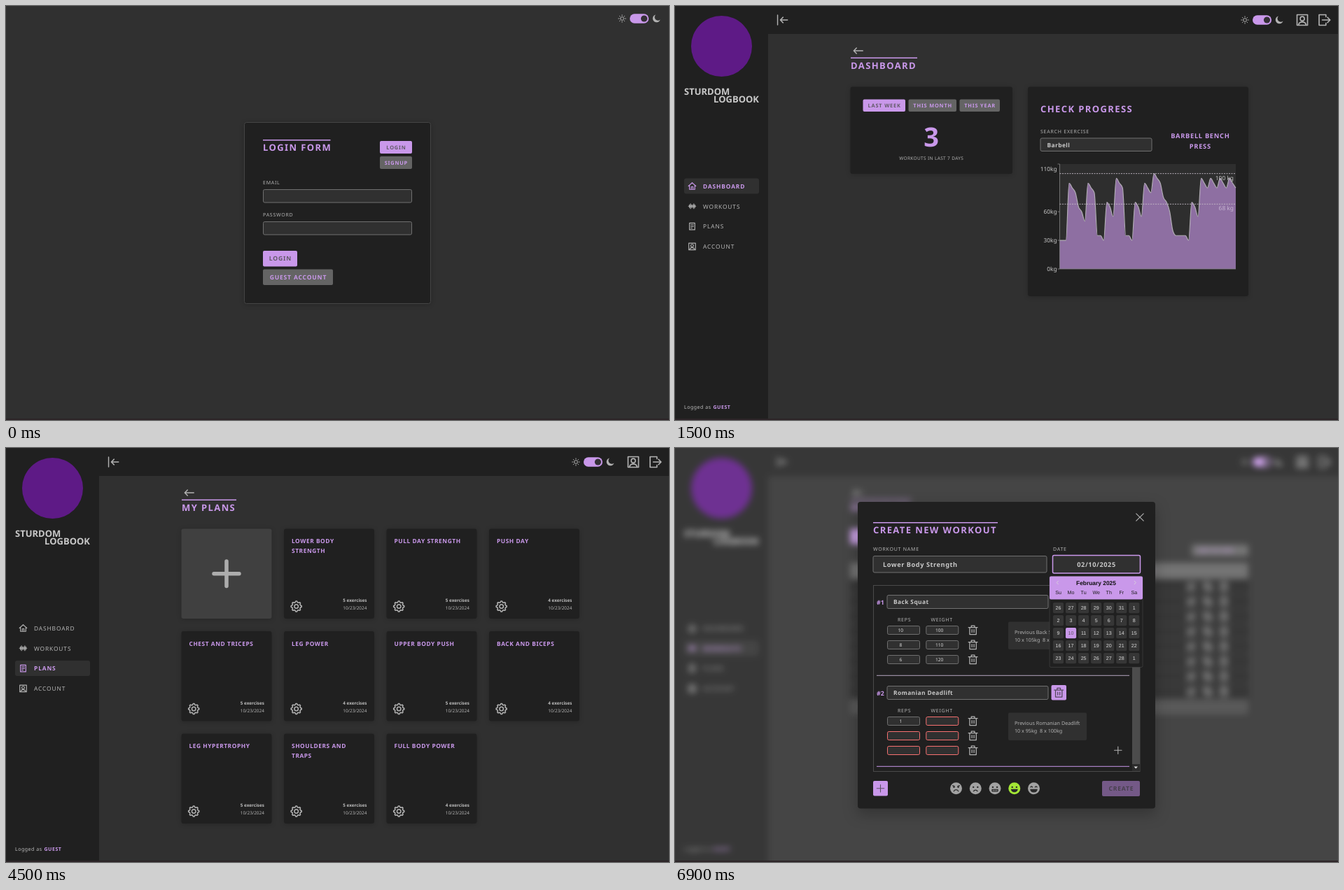
Animation, 947 px wide and 592 px high, one loop 7.5 s. Source, as an HTML page:

```html
<!DOCTYPE html>
<html lang="en">
<head>
<meta charset="utf-8">
<title>Training app tour</title>
<style>
html, body { margin: 0; width: 100%; height: 100%; overflow: hidden; background: #303030; }
svg { display: block; width: 947px; height: 592px; font-family: "Noto Sans", "Open Sans", sans-serif; text-rendering: geometricPrecision; }
text { white-space: pre; }
.scene { visibility: hidden; animation: show 7.5s step-end infinite; }
@keyframes show { 0% { visibility: visible } 20%, 100% { visibility: hidden } }
.card { filter: drop-shadow(0 1.5px 3px rgba(0, 0, 0, .2)); }
.modal { filter: drop-shadow(0 8px 10px rgba(0, 0, 0, .25)); }
.blur { filter: blur(5px); }
.picker { font-family: "Liberation Sans", Arial, sans-serif; }
</style>
</head>
<body>
<svg id="stage" viewBox="0 0 947 592"></svg>
<script>
const ACC = '#c998ea', DARK = '#202020', BG = '#303030', MID = '#646464',
      TXT = '#b2b2b2', LIGHT = '#dcdcdc', RED = '#f87171', LIME = '#a3e635';

const range = n => [...Array(n).keys()];
const each = (list, fn) => list.map(fn).join('');

// Basic shapes
const rect = (x, y, w, h, fill, r = 0, more = '') =>
  `<rect x="${x}" y="${y}" width="${w}" height="${h}" rx="${r}" fill="${fill}" ${more}/>`;
const circle = (x, y, r, fill, more = '') =>
  `<circle cx="${x}" cy="${y}" r="${r}" fill="${fill}" ${more}/>`;
const path = (d, color, sw = 1, more = '') =>
  `<path d="${d}" fill="none" stroke="${color}" stroke-width="${sw}" ${more}/>`;
const text = (x, y, s, size, { w = 400, c = TXT, ls = 0, a = 'start' } = {}) =>
  `<text x="${x}" y="${y}" font-size="${size}" font-weight="${w}" fill="${c}" letter-spacing="${ls}" text-anchor="${a}">${s}</text>`;

// Line icons on a 24 unit grid
const gear = range(32).map(i => {
  const r = i % 4 < 2 ? 11 : 8.7, t = (i - .5) * Math.PI / 16;
  return `${i ? 'L' : 'M'}${(12 + r * Math.cos(t)).toFixed(2)} ${(12 + r * Math.sin(t)).toFixed(2)}`;
}).join('') + 'zM8 12a4 4 0 1 0 8 0a4 4 0 1 0-8 0';
const rays = each(range(8), i => {
  const c = Math.cos(i * Math.PI / 4), s = Math.sin(i * Math.PI / 4);
  return `M${12 + 8.5 * c} ${12 + 8.5 * s}L${12 + 11 * c} ${12 + 11 * s}`;
});
const ICONS = {
  edit: 'M11 4H5a3 3 0 0 0-3 3v12a3 3 0 0 0 3 3h12a3 3 0 0 0 3-3v-6M8 16l1-4.5L18.5 2l3.500 3.500L12.500 15z',
  copy: 'M7 7h15v15H7zM2 17V2h15M14.500 10.500v8M10.500 14.500h8',
  trash: 'M1 6h22M4 6v17h16V6M8 6V1.500h8V6M9.500 11v7M14.500 11v7',
  down: 'M5 8.500l7 7 7-7',
  up: 'M5 15.500l7-7 7 7',
  left: 'M15 5l-7 7 7 7',
  right: 'M9 5l7 7-7 7',
  plus: 'M12 1v22M1 12h22',
  close: 'M2 2l20 20M22 2L2 22',
  back: 'M24 12H1M8 5l-7 7 7 7',
  collapse: 'M2 1v22M24 12H8M14 6l-6 6 6 6',
  home: 'M1 12L12 2l11 10M4 10v12h16V10M9.500 22v-8h5v8',
  plans: 'M4 2h16v20H4zM8 7h8M8 12h8M8 17h4',
  account: 'M2 2h20v20H2zM8 9.500a4 4 0 1 0 8 0a4 4 0 1 0-8 0M5 21c1-7 13-7 14 0',
  workouts: 'M4 8v8M7 5v14M10 8v8M14 8v8M17 5v14M20 8v8M1 12h22',
  logout: 'M15 6V2H2v20h13v-4M8 12h15M18 7l5 5-5 5',
  sort: 'M1 4h14M1 10h11M1 16h8M1 22h6M19 3v18M14.500 17l4.500 4.500 4.500-4.500',
  sun: 'M7 12a5 5 0 1 0 10 0a5 5 0 1 0-10 0' + rays,
  gear
};
const icon = (name, x, y, size, color = TXT, sw = 2.2) =>
  `<g transform="translate(${x - size / 2} ${y - size / 2}) scale(${size / 24})">` +
  path(ICONS[name], color, sw, 'stroke-linejoin="round" stroke-linecap="round"') + '</g>';

// Rating faces on a unit circle
const INK = '#2a2a2a';
const eyes = circle(-.36, -.22, .14, INK) + circle(.36, -.22, .14, INK);
const FACES = {
  awful: eyes + path('M-.62-.5l.4.16M.62-.5l-.4.16M-.42.52c.2-.4.64-.4.84 0', INK, .15),
  bad: eyes + path('M-.36.5c.2-.3.52-.3.72 0', INK, .16),
  fair: eyes + rect(-.55, .12, 1.1, .42, INK, .12) + path('M-.45.33h.9M-.2.18v.3M.2.18v.3', '#aaa', .06),
  good: eyes + `<path d="M-.58.1h1.16a.58.54 0 0 1-1.16 0z" fill="${INK}"/>`,
  great: path('M-.58-.16q.2-.34.4 0M.18-.16q.2-.34.4 0', INK, .15) +
    `<path d="M-.62.1h1.24a.62.58 0 0 1-1.24 0z" fill="${INK}"/>`
};
const FACE_COLORS = { awful: RED, fair: '#facc15', good: LIME, great: '#4ade80' };
const face = (type, x, y, r, color = FACE_COLORS[type]) =>
  `<g transform="translate(${x} ${y}) scale(${r})">${circle(0, 0, 1, color)}${FACES[type]}</g>`;

// Interface parts
const card = (x, y, w, h, fill = DARK) => rect(x, y, w, h, fill, 3, 'class="card"');
const title = (x, y, s, w) =>
  rect(x, y - 16, w, 1.5, ACC) + text(x, y, s, 13, { w: 700, c: ACC, ls: 1.4 });
const label = (x, y, s) => text(x, y, s, 7, { w: 500, ls: .75 });
const field = (x, y, w, h, border = '#707070', sw = 1) =>
  rect(x + .5, y + .5, w - 1, h - 1, BG, 2, `stroke="${border}" stroke-width="${sw}"`);
const button = (x, y, w, h, s, on = true, size = 8.6, fill = on ? ACC : MID, c = on ? '#625a68' : ACC) =>
  rect(x, y, w, h, fill, 2) +
  text(x + w / 2 + .4, y + h / 2 + size * .36, s, size, { w: 600, c, ls: .8, a: 'middle' });

const themeSwitch = (x, y) =>
  icon('sun', x, y, 11.500, TXT, 2) + rect(x + 11, y - 6.7, 27, 13.4, ACC, 6.7) +
  circle(x + 31.5, y, 4.6, '#343036') +
  `<path transform="translate(${x + 43} ${y - 6}) scale(.5)" d="M23 15A11 11 0 1 1 10 1a9 9 0 0 0 13 14z" fill="${TXT}"/>`;

const NAV = ['home', 'workouts', 'plans', 'account'];
function shell(active) {
  const nav = each(NAV, (name, i) => {
    const y = 257.5 + i * 28.8, on = i === active;
    return (on ? rect(13, y - 11, 107, 22, BG, 3) : '') +
      icon(name, 24.5, y, 11.5, on ? ACC : TXT, 2.4) +
      text(40, y + 3.3, i ? name.toUpperCase() : 'DASHBOARD', 8.4,
        { w: on ? 700 : 500, c: on ? ACC : TXT, ls: .87 });
  });
  return rect(-60, -60, 1070, 720, BG) + rect(-60, -60, 1070, 100, DARK) + rect(-60, -60, 193, 720, DARK) +
    circle(66.5, 57.5, 43.5, '#5e1a86') +
    text(13, 126.500, 'STURDOM', 13, { w: 700, c: '#c8c8c8' }) +
    text(120, 137.5, 'LOGBOOK', 13, { w: 700, c: '#c8c8c8', a: 'end' }) + nav +
    text(13, 576, 'Logged as', 7, { w: 500, c: '#c0c0c0', ls: .52 }) +
    text(54.5, 576, 'GUEST', 7, { w: 700, c: ACC, ls: .55 }) +
    icon('collapse', 153, 20, 15.5) + themeSwitch(814, 20) +
    icon('account', 896, 20, 18) + icon('logout', 927.5, 20, 18) + icon('back', 261.5, 64, 13.5, TXT, 2.6);
}

function login() {
  return rect(0, 0, 947, 592, BG) + themeSwitch(880, 18) +
    rect(340.5, 166.5, 266, 259, DARK, 3, 'stroke="#454545" class="card"') +
    title(367, 207, 'LOGIN FORM', 96.5) +
    button(534, 193, 46, 18, 'LOGIN', true, 7.4) + button(534, 215, 46, 18, 'SIGNUP', false, 7.4) +
    label(367, 255, 'EMAIL') + field(367, 262, 213, 19.5) +
    label(367, 301, 'PASSWORD') + field(367, 308, 213, 19.5) +
    button(367, 350, 49, 22.5, 'LOGIN') + button(367, 376.5, 100, 22.5, 'GUEST ACCOUNT', false);
}

const LIFTS = [30, 30, 30, 90, 85, 80, 65, 60, 50, 90, 85, 80, 35, 35, 30, 70, 65, 55, 95, 90, 85,
  35, 35, 30, 70, 65, 55, 90, 85, 80, 100, 95, 90, 75, 70, 60, 40, 35, 35, 35, 35, 30, 70, 65, 55,
  95, 90, 85, 95, 90, 85, 95, 90, 85, 95, 90, 85];
const kgY = kg => 376 - kg * 150 / 110;

// Monotone cubic curve through evenly spaced points
function curve(ys, x0, dx) {
  const d = ys.slice(1).map((y, i) => y - ys[i]);
  const m = ys.map((_, i) => {
    const a = d[i - 1] ?? d[i], b = d[i] ?? a;
    return a * b <= 0 ? 0 : Math.sign(a) * Math.min(Math.abs(a), Math.abs(b), Math.abs(a + b) / 4) * (i ? 2 : 1);
  });
  return ys.map((y, i) => {
    const x = x0 + i * dx;
    return i ? `C${x - dx * 2 / 3} ${ys[i - 1] + m[i - 1] / 3} ${x - dx / 3} ${y - m[i] / 3} ${x} ${y}` : `M${x} ${y}`;
  }).join('');
}

function chart() {
  const line = curve(LIFTS.map(kgY), 549.5, 4.49);
  return rect(549.5, 226, 251.5, 150, '#2e2e2e') +
    `<path d="${line}V376H549.5z" fill="#8e6fa2"/>` + path(line, '#b0acb3', 1.2) +
    path('M549.5 226V376H801', '#858585', .8) +
    each([[0, 376], [30, 335], [60, 294], [110, 233]], ([kg, y]) =>
      path(`M546.500 ${kgY(kg)}h3`, '#858585', .8) +
      text(545.5, y + 3, kg + 'kg', 8.3, { c: '#c8c8c8', a: 'end' })) +
    each([100, 68], kg =>
      path(`M549.5 ${kgY(kg)}H801`, '#c4bcc8', .9, 'stroke-dasharray="2 1.5"') +
      text(798, kgY(kg) + 9.2, kg + ' kg', 8.4, { c: kg > 90 ? '#c4c4c4' : '#c6b3d2', a: 'end' }));
}

function dashboard() {
  return shell(0) + title(251, 89.5, 'DASHBOARD', 95) +
    card(250.5, 115.5, 231.5, 124.5) + card(504, 115.5, 315, 299.5) +
    button(268.5, 133.5, 60.5, 17.5, 'LAST WEEK', true, 7.4) +
    button(333.5, 133.5, 68.5, 17.5, 'THIS MONTH', false, 7.4) +
    button(406.5, 133.5, 57.5, 17.5, 'THIS YEAR', false, 7.4) +
    text(366, 200.5, '3', 38, { w: 600, c: ACC, a: 'middle' }) +
    text(366.2, 220, 'WORKOUTS IN LAST 7 DAYS', 6.5, { ls: .35, a: 'middle' }) +
    text(522, 151.5, 'CHECK PROGRESS', 13, { w: 700, c: ACC, ls: 1.4 }) +
    label(522, 181.7, 'SEARCH EXERCISE') + field(521.5, 188.5, 160, 19.5) +
    text(531.5, 201.5, 'Barbell', 8.4, { w: 600, c: '#c8c8c8', ls: .4 }) +
    text(750.3, 188.5, 'BARBELL BENCH', 9.3, { w: 700, c: ACC, ls: .7, a: 'middle' }) +
    text(750.3, 204.3, 'PRESS', 9.3, { w: 700, c: ACC, ls: .7, a: 'middle' }) + chart();
}

const SESSIONS = [
  ['Push Day 5', '10/22/2024', 'good'], ['Back and Biceps 5', '10/20/2024', 'great'],
  ['Back and Biceps 4', '10/18/2024', 'awful'], ['Lower Body Strength Session 3', '10/17/2024', 'good'],
  ['Push Day 4', '10/17/2024', 'great'], ['Upper Body Push Session 3', '10/16/2024', 'fair'],
  ['Full Body Power Session 3', '10/15/2024', 'good'], ['Push Day 3', '10/12/2024', 'good']];
const SETS = [
  ['BARBELL BENCH PRESS', '10x85kg  8x90kg  6x95kg'], ['INCLINE DUMBBELL PRESS', '10x45kg  8x50kg  6x55kg'],
  ['DUMBBELL FLYES', '10x22.5kg  8x25kg  6x27.5kg'], ['OVERHEAD BARBELL PRESS', '10x55kg  8x60kg  6x65kg']];

function workouts(open) {
  const rowH = 21.4, gap = open ? 81 : 0, end = 187.5 + 8 * rowH + gap;
  const head = (x, s) => text(x, 179.4, s, 8.9, { w: 700, c: ACC, ls: 1.5 });
  const rows = each(SESSIONS, ([name, date, rate], i) => {
    const y = 198.2 + i * rowH + (i ? gap : 0), on = open && !i;
    return (i ? path(`M250.5 ${y - 10.7}h568.5`, '#484848') : '') +
      icon(on ? 'up' : 'down', 275.7, y, 12, TXT, 3) +
      text(321.5, y + 3.1, name, 8.5, { w: on ? 700 : 500, c: on ? ACC : LIGHT }) +
      text(579.5, y + 3.1, date, 8.5, { c: '#d0d0d0', a: 'middle' }) + face(rate, 670, y, 6.8) +
      icon('edit', 737.5, y, 13.5) + icon('copy', 760.8, y, 14) + icon('trash', 784, y, 14);
  });
  const detail = open ? rect(250.5, 209, 568.5, 81, '#353236') + each(SETS, ([name, sets], i) => {
    const y = 221.4 + i * 20.3;
    return text(330.8, y, name, 7.1, { w: 500, c: ACC, ls: .6 }) +
      text(534.5, y, sets.replace(/ /g, '\u00a0'), 7.1, { w: 500, c: LIGHT, ls: .42 }) +
      (i < 3 ? path(`M322 ${y + 7.1}H748`, '#a0a0a0', .8) : '');
  }) : '';
  const foot = end + 14;
  const arrow = 'M0-3h6.500v-3.500l7.500 6.500-7.500 6.500v-3.500h-6.500z';
  return shell(1) + title(251, 89.5, 'WORKOUTS', 86) + button(250.5, 115.5, 65.5, 22, 'ADD NEW') +
    rect(738, 138, 81, 17, MID, 2) + text(746.3, 149.2, 'SORT BY DATE', 6.8, { w: 600, c: ACC, ls: .45 }) +
    icon('down', 813.8, 146.3, 7, TXT, 3) +
    rect(250.5, 164, 568.5, end + 23 - 164, DARK, 2, 'class="card"') + rect(250.5, 164, 568.5, 23.5, MID, 2) +
    icon('sort', 276, 176, 13.5) + head(394, 'NAME') + head(565, 'DATE') + head(656, 'RATE') + detail + rows +
    rect(250.5, end, 568.5, 23, '#464646', 2) +
    `<path d="${arrow}" transform="translate(425 ${end + 11.5}) scale(-1 1)" fill="#777"/>` +
    `<path d="${arrow}" transform="translate(645 ${end + 11.5})" fill="${TXT}"/>` +
    text(432, foot, 'PREVIOUS', 7, { w: 700, c: '#c8c8c8', ls: 1.2 }) +
    text(520.5, foot, '1 to 8 of 19', 7.2, { w: 500, c: LIGHT, ls: .9 }) +
    text(614, foot, 'NEXT', 7, { w: 700, c: '#c8c8c8', ls: 1.25 });
}

const PLANS = [['LOWER BODY|STRENGTH', 5], ['PULL DAY STRENGTH', 5], ['PUSH DAY', 4], ['CHEST AND TRICEPS', 5],
  ['LEG POWER', 4], ['UPPER BODY PUSH', 5], ['BACK AND BICEPS', 4], ['LEG HYPERTROPHY', 5],
  ['SHOULDERS AND|TRAPS', 5], ['FULL BODY POWER', 4]];

function plans() {
  return shell(2) + title(251, 89.5, 'MY PLANS', 78) + card(250.5, 115.5, 129, 128.5, '#404040') +
    path('M315 162v35.500M297 179.700h36', '#adadad', 5.5, 'stroke-linecap="round"') +
    each(PLANS, ([name, count], k) => {
      const i = k + 1, x = 250.5 + i % 4 * 146.5, y = 115.5 + Math.floor(i / 4) * 146.5;
      return card(x, y, 129, 128.5) +
        each(name.split('|'), (s, n) => text(x + 11, y + 20.8 + n * 13.6, s, 8.4, { w: 700, c: ACC, ls: .55 })) +
        icon('gear', x + 17.7, y + 111, 16.5, TXT, 2.2) +
        text(x + 118.3, y + 104.6, count + ' exercises', 6.3, { w: 700, c: '#bcbcbc', a: 'end' }) +
        text(x + 118.3, y + 115.6, '10/23/2024', 6.4, { a: 'end' });
    });
}

function exercise(n, y, name, sets, previous) {
  const cell = (x, yy, v) => field(x, yy - 6.5, 47, 13, v === '' ? RED : '#707070') +
    text(x + 19.3, yy + 2.4, v, 6.6, { w: 500, c: LIGHT, a: 'middle' });
  return text(288, y + 3.6, '#' + n, 8.8, { w: 700, c: ACC }) + field(302.5, y - 10, 231, 20) +
    text(312, y + 3.3, name, 8.4, { w: 600, c: '#c8c8c8', ls: .4 }) +
    label(318, y + 28, 'REPS') + label(365.5, y + 28, 'WEIGHT') +
    each(sets, ([reps, kg], i) => {
      const yy = y + 40.5 + i * 21;
      return cell(303, yy, reps) + cell(358.3, yy, kg) + icon('trash', 425.6, yy - .3, 14);
    }) +
    rect(476, y + 28.5, 112, 39.5, BG, 2) + text(485, y + 45.7, 'Previous ' + name, 7.2) +
    text(485, y + 56.8, previous.replace(/ /g, '\u00a0'), 7.2);
}

function picker() {
  const col = i => 547.5 + i * 18.05;
  const mid = (x, y, s, size, c, w = 400) => text(x, y, s, size, { c, w, a: 'middle' });
  return '<g class="picker">' + rect(535, 183.5, 133, 130, DARK, 2, 'stroke="#484848" stroke-width=".6"') +
    rect(535, 183.5, 133, 33, ACC, 2) + mid(601.5, 195.6, 'February 2025', 8.4, '#111', 700) +
    icon('left', 546.5, 192.5, 8, '#d8d0dc', 3) + icon('right', 657, 192.5, 8, '#d8d0dc', 3) +
    each(['Su', 'Mo', 'Tu', 'We', 'Th', 'Fr', 'Sa'], (s, i) => mid(col(i), 209.4, s, 7.1, '#1c1c1c')) +
    each(range(35), i => {
      const x = col(i % 7), y = 228.7 + Math.floor(i / 7) * 18;
      const day = i < 6 ? 26 + i : (i - 6) % 28 + 1, on = i === 15;
      return rect(x - 7.6, y - 7.6, 15.2, 15.2, on ? ACC : '#363636', 2) +
        mid(x, y + 2.6, day, 7.1, on ? '#5c5262' : LIGHT);
    }) + '</g>';
}

function create() {
  return `<g class="blur">${workouts(false)}</g>` + rect(0, 0, 947, 592, '#fff', 0, 'opacity=".1"') +
    rect(261, 77, 425, 438.5, DARK, 4, 'class="modal"') + icon('close', 664, 99, 12.5) +
    title(283, 122, 'CREATE NEW WORKOUT', 178) +
    label(283, 147.3, 'WORKOUT NAME') + label(540, 147.3, 'DATE') +
    field(282.5, 154, 249, 24.5) + text(297, 170.3, 'Lower Body Strength', 9.2, { w: 600, c: '#c8c8c8', ls: .55 }) +
    field(539, 153, 126, 26.5, ACC, 1.5) +
    text(602, 170.3, '02/10/2025', 9.2, { w: 600, c: '#c8c8c8', ls: .6, a: 'middle' }) +
    rect(283.5, 196.5, 380.5, 266, 'none', 0, 'stroke="#4a4a4a"') +
    rect(653, 197, 11, 255, '#4c4c4c') + rect(653, 452, 11, 10, '#2c2c2c') +
    '<path d="M655.500 455.500h5.500l-2.750 3z" fill="#ddd"/>' +
    exercise(1, 220, 'Back Squat', [[10, 100], [8, 110], [6, 120]], '10 x 105kg  8 x 110kg') +
    path('M288 325.3H649', '#b5a6c0') +
    exercise(2, 350, 'Romanian Deadlift', [[1, ''], ['', ''], ['', '']], '10 x 95kg  8 x 100kg') +
    path('M288 455.3H649', ACC) +
    rect(537.5, 339, 21.5, 21.5, ACC, 2) + icon('trash', 548.2, 349.6, 14, '#55485e') +
    icon('plus', 632.8, 432.2, 11.5) + picker() +
    rect(283, 476, 21, 21.5, ACC, 2) + icon('plus', 293.5, 486.7, 11.5, '#5c5264') +
    each(['awful', 'bad', 'fair', 'good', 'great'], (type, i) =>
      face(type, 401.5 + i * 27.75, 486.8, 8.5, i === 3 ? LIME : '#a2a2a2')) +
    button(610, 476, 54, 22, 'CREATE', true, 8.6, '#745987', '#47404d');
}

document.getElementById('stage').innerHTML =
  each([login, dashboard, () => workouts(true), plans, create], (scene, i) =>
    `<g class="scene" style="animation-delay:${i * 1.5 - 7.5}s">${scene()}</g>`) +
  rect(0, 590, 947, 2, '#2c2427');
</script>
</body>
</html>
```
